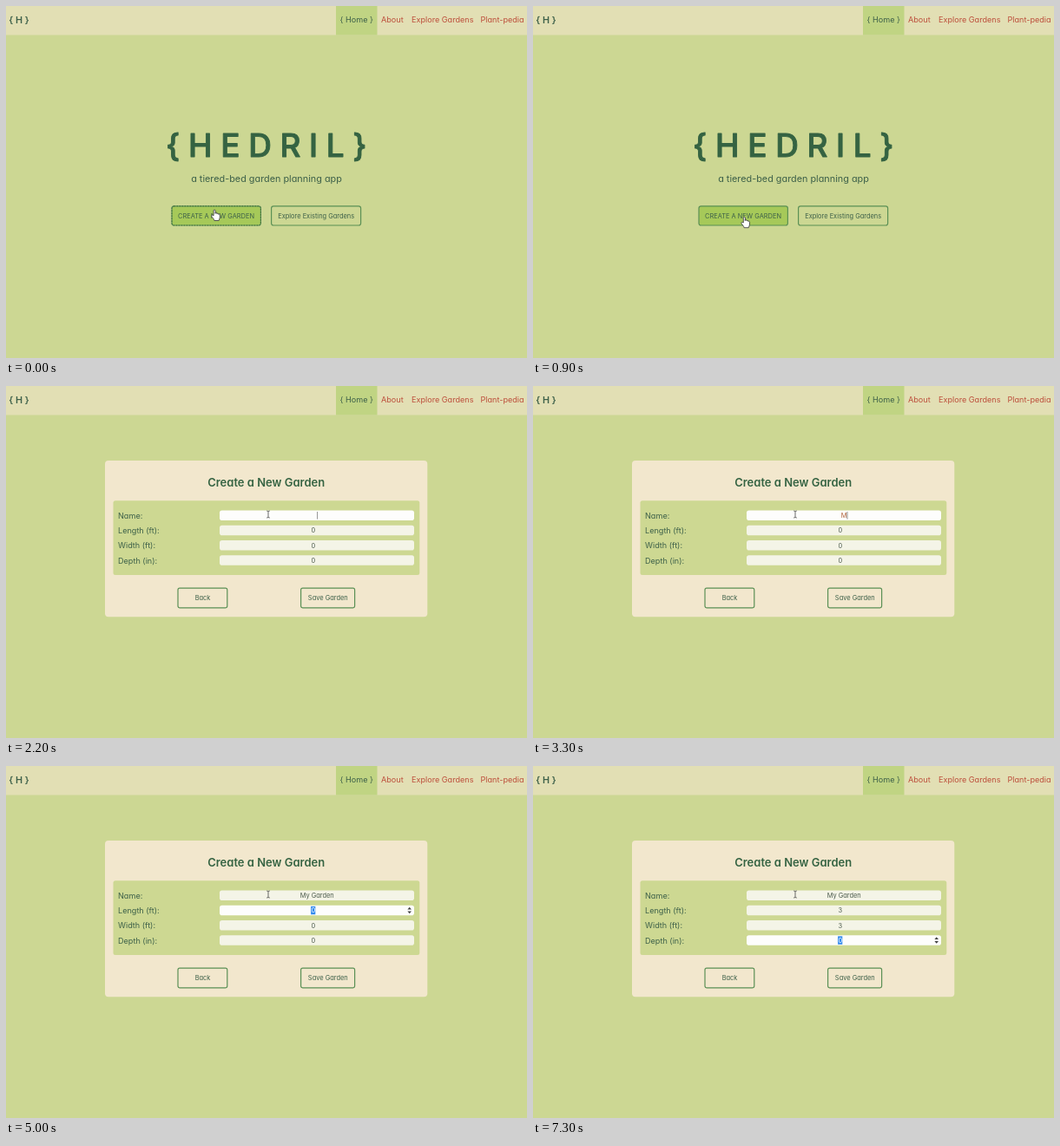
Write an HTML page that moves like this. It is 600x406 px and loops after 8 s.

```html
<!DOCTYPE html>
<html lang="en">
<head>
<meta charset="utf-8">
<title>Garden planner</title>
<style>
  html, body { margin: 0; width: 100%; height: 100%; overflow: hidden; background: #ccd793; }
  svg { display: block; width: 100vw; height: 100vh; }
  text {
    font-family: Inter, Lato, sans-serif;
    font-feature-settings: "cv11";
    font-optical-sizing: none;
    fill: #3d6049;
    white-space: pre;
  }
  .nav text, .label { font-size: 9.1px; }
  .nav .link { fill: #bd4f3c; }
  .nav .brand { font-size: 10.8px; font-weight: 600; }
  .title { font-size: 37px; font-weight: 500; letter-spacing: 9.6px; fill: #356342; stroke: #356342; stroke-width: .9; stroke-linejoin: round; }
  .tagline { font-size: 10.85px; }
  .heading { font-size: 13px; font-weight: 600; fill: #356342; }
  .mid { text-anchor: middle; }
  .small { font-size: 7.45px; text-anchor: middle; }
  .button { fill: none; stroke: #5b9055; stroke-width: 1.2; }
  .caret { stroke: #777; stroke-width: .8; }
</style>
</head>
<body>
<svg viewBox="0 0 600 406" preserveAspectRatio="none">
  <rect width="600" height="406" fill="#ccd793"/>
  <g class="nav">
    <rect width="600" height="33.5" fill="#e2dfb4"/>
    <rect x="380" width="47.5" height="33.5" fill="#c0d483"/>
    <text class="brand" x="3.3" y="19.6">{ H }</text>
    <text class="mid" x="403.8" y="18.9">{ Home }</text>
    <text class="link" x="432" y="18.9">About</text>
    <text class="link" x="467" y="18.9">Explore Gardens</text>
    <text class="link" x="546.5" y="18.9">Plant-pedia</text>
  </g>

  <g id="home">
    <text class="title" x="184" y="174">{HEDRIL}</text>
    <text class="tagline mid" x="300" y="203.2">a tiered-bed garden planning app</text>
    <rect class="button" x="191" y="230.8" width="102.4" height="22.2" rx="2.5" style="fill:#a6c959"/>
    <rect id="focusRing" x="191" y="230.8" width="102.4" height="22.2" rx="2.5" fill="none" stroke="#355f35" stroke-width=".8" stroke-dasharray="1.5 1.5"/>
    <text class="small" x="242" y="244.6">CREATE A NEW GARDEN</text>
    <rect class="button" x="305.6" y="230.8" width="103" height="22.2" rx="2.5"/>
    <text class="small" x="357.2" y="244.6">Explore Existing Gardens</text>
  </g>

  <g id="form">
    <rect x="114" y="86" width="371.3" height="180.3" rx="4" fill="#f2e7cd"/>
    <text class="heading mid" x="299.7" y="116">Create a New Garden</text>
    <rect x="123.5" y="132.2" width="352.8" height="85.8" rx="2.5" fill="#cdd892"/>
    <g id="rows"></g>
    <rect class="button" x="198" y="233.2" width="56.8" height="22.6" rx="2"/>
    <text id="back" class="small" x="226.6" y="247.2">Back</text>
    <rect class="button" x="339.6" y="233.2" width="62" height="22.6" rx="2"/>
    <text class="small" x="370.8" y="247.2">Save Garden</text>
  </g>

  <path id="hand" d="M-1.4 5.5V-.2C-1.4-1.6.6-1.6.6-.2V3.1C1-.1 2.4 2.3 2.4 3.4 2.8 2.5 4.2 2.9 4.2 4 4.7 3.4 5.8 3.7 5.8 4.8V7.5C5.8 9.2 4.7 9.6 4.6 11.2H-.6C-.8 9.4-3 7.7-3.7 6.1-4 5-2.8 4.4-2.1 5.1Z" fill="#fff" stroke="#333" stroke-width=".8" stroke-linejoin="round"/>
  <path id="arrow" d="M0 0V9.6L2.2 7.6 3.7 11 5.2 10.3 3.8 7.1H6.8Z" fill="#222" stroke="#fff" stroke-width=".7"/>
  <path id="beam" d="M-1.8-4Q0-4 0-3Q0-4 1.8-4M0-3V3M-1.8 4Q0 4 0 3Q0 4 1.8 4" fill="none" stroke="#444" stroke-width=".8"/>
</svg>
<script>
const LOOP = 8000;
const FORM_AT = 1400;
const NAME = "My Garden";
const KEY_TIMES = [3300, 3400, 3600, 4000, 4100, 4200, 4400, 4600, 4700];
const FOCUS_TIMES = [2200, 5000, 6500, 7300];
const DIGIT_TIMES = [0, 6000, 6800, Infinity];
const LABELS = ["Name:", "Length (ft):", "Width (ft):", "Depth (in):"];

const $ = id => document.getElementById(id);
const show = (el, on) => { el.style.display = on ? "" : "none"; };
const place = (el, x, y) => el.setAttribute("transform", `translate(${x} ${y})`);
const passed = (times, t) => times.filter(at => t >= at).length;

const rows = LABELS.map((label, i) => {
  const y = 149.3 + i * 17.25;
  const centre = i ? 353.8 : 358.2;
  const g = document.createElementNS("http://www.w3.org/2000/svg", "g");
  g.innerHTML = `
    <text class="label" x="129" y="${y + 3.5}">${label}</text>
    <rect class="field" x="246" y="${y - 5.8}" width="224" height="11.5" rx="2.8"/>
    <rect class="pick" x="${centre - 2.7}" y="${y - 4.7}" width="5.2" height="9.4" fill="#338bee"/>
    <text class="value small" x="${centre}" y="${y + 2.8}"></text>
    <path class="caret" d="M0 ${y - 4.3}V${y + 4.3}"/>
    <path class="spin" d="M462.4 ${y - 1}l2.3-2.8 2.3 2.8zM462.4 ${y + 1}l2.3 2.8 2.3-2.8z" fill="#444"/>`;
  $("rows").append(g);
  const part = name => g.querySelector("." + name);
  return { centre, field: part("field"), pick: part("pick"), value: part("value"), caret: part("caret"), spin: part("spin") };
});

function drawRow(row, i, t, focus) {
  const active = i === focus;
  const typed = i > 0 && t >= DIGIT_TIMES[i];
  const picked = active && i > 0 && !typed;
  const text = i ? (typed ? "3" : "0") : NAME.slice(0, passed(KEY_TIMES, t));
  row.value.textContent = text;
  row.value.style.fill = picked ? "#fff" : active ? "#b0633c" : "#4c5b4d";
  row.field.style.fill = active ? "#fdfdfc" : "#f4f4e7";
  show(row.pick, picked);
  show(row.spin, active && i > 0);
  show(row.caret, active && !picked && !(t >= 2800 && t < 3300));
  const width = text ? row.value.getComputedTextLength() : 0;
  place(row.caret, row.centre + width / 2 + .4, 0);
}

function drawPointer(t) {
  const press = Math.min(1, Math.max(0, (t - 400) / 500));
  const k = Math.min(1, Math.max(0, (t - 1400) / 700));
  const glide = k * k * (3 - 2 * k);
  const startX = 240.5 + 3.2 * press, startY = 236.3 + 8.2 * press;
  const x = startX + (302 - startX) * glide;
  const y = startY + (148 - startY) * glide;
  const onForm = t >= FORM_AT;
  const onBack = onForm && x < 255 && y > 233;
  const inField = onForm && x > 246 && [0, 1, 2, 3].some(i => Math.abs(y - 149.3 - i * 17.25) < 5.8);
  show($("hand"), !onForm || onBack);
  show($("beam"), inField);
  show($("arrow"), onForm && !onBack && !inField);
  for (const id of ["hand", "beam", "arrow"]) place($(id), x, y);
  $("back").textContent = onBack ? "BACK" : "Back";
}

function draw(time) {
  const t = Math.floor(time / 100) * 100;
  show($("home"), t < FORM_AT);
  show($("form"), t >= FORM_AT);
  show($("focusRing"), t < 500);
  const focus = passed(FOCUS_TIMES, t) - 1;
  if (t >= FORM_AT) rows.forEach((row, i) => drawRow(row, i, t, focus));
  drawPointer(t);
}

const start = performance.now();
function tick() {
  draw((performance.now() - start) % LOOP);
  requestAnimationFrame(tick);
}
tick();
</script>
</body>
</html>
```
